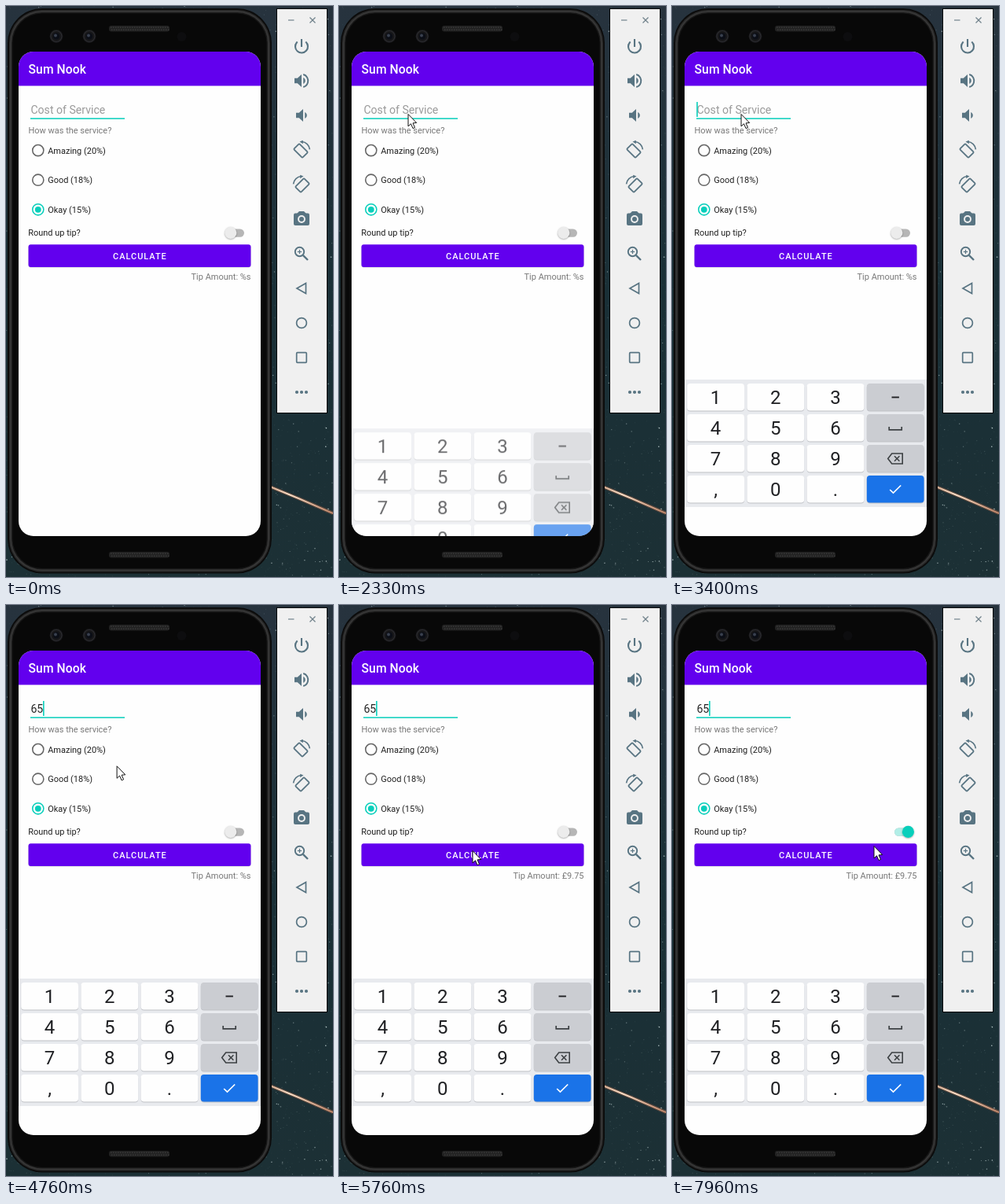
An HTML page with a canvas that plays this animation: 416x726 px, repeating every 8000 ms.

```html
<!DOCTYPE html>
<html lang="en">
<head>
<meta charset="utf-8">
<title>Tip calculator</title>
<style>
html, body { margin: 0; width: 100%; height: 100%; overflow: hidden; background: #14232a; }
canvas { display: block; width: 416px; height: 726px; }
</style>
</head>
<body>
<canvas id="stage"></canvas>
<script>
const W = 416, H = 726, LOOP = 8000;
const DP = 308 / 393; // screen pixels per device-independent pixel
const PURPLE = '#6200ee', TEAL = '#08cfbb', ICON = '#587482';
const dpr = window.devicePixelRatio || 1;

function setup(canvas) {
  canvas.width = W * dpr;
  canvas.height = H * dpr;
  const c = canvas.getContext('2d');
  c.scale(dpr, dpr);
  return c;
}
const stage = setup(document.getElementById('stage'));
const backdrop = document.createElement('canvas');
const keyboard = document.createElement('canvas');
let g = setup(backdrop);

const clamp = v => Math.max(0, Math.min(1, v));
const span = (t, a, b) => clamp((t - a) / (b - a));
const smooth = p => p * p * (3 - 2 * p);

function box(x, y, w, h, r, fill) {
  g.beginPath();
  g.roundRect(x, y, w, h, r);
  if (fill) { g.fillStyle = fill; g.fill(); }
}
function disc(x, y, r, fill) {
  g.beginPath();
  g.arc(x, y, r, 0, Math.PI * 2);
  g.fillStyle = fill;
  g.fill();
}
function ring(x, y, r, color, width) {
  g.beginPath();
  g.arc(x, y, r, 0, Math.PI * 2);
  pen(color, width);
}
function pen(color, width) {
  g.strokeStyle = color;
  g.lineWidth = width;
  g.stroke();
}
function trace(points, closed) {
  g.beginPath();
  points.forEach(([x, y], i) => i ? g.lineTo(x, y) : g.moveTo(x, y));
  if (closed) g.closePath();
}
function line(x1, y1, x2, y2, color, width) {
  trace([[x1, y1], [x2, y2]]);
  pen(color, width);
}
function label(str, x, y, sp, color, { weight = 400, gap = 0, align = 'left' } = {}) {
  g.font = `${weight} ${sp * DP}px Roboto, sans-serif`;
  g.letterSpacing = gap + 'px';
  g.textAlign = align;
  g.fillStyle = color;
  g.fillText(str, x, y);
}

// ---- desktop, phone and side panel ----

function drawDesktop() {
  const sky = g.createLinearGradient(0, 0, 0, H);
  sky.addColorStop(0, '#27333e');
  sky.addColorStop(0.5, '#1a3037');
  sky.addColorStop(1, '#1c3035');
  g.fillStyle = sky;
  g.fillRect(0, 0, W, H);
  let seed = 41;
  const rnd = () => (seed = (seed * 16807) % 2147483647) / 2147483647;
  for (let i = 0; i < 4200; i++) {
    const x = rnd() * W, y = rnd() * H, s = 0.6 + rnd() * 0.8, a = 0.06 + rnd() ** 7 * 0.85;
    g.fillStyle = `rgba(205,222,222,${a})`;
    g.fillRect(x, y, s, s);
  }
  const streak = g.createLinearGradient(337, 0, W, 0);
  streak.addColorStop(0, '#d9b196');
  streak.addColorStop(0.3, '#f8dcc4');
  streak.addColorStop(1, '#bd8468');
  trace([[332, 609.5], [372, 626], [W, 645]]);
  pen('rgba(170,100,70,.4)', 4.5);
  pen(streak, 2);
}

function speaker(y) {
  box(131, y, 77, 7.5, 3, '#222');
  for (let x = 133; x < 207; x += 3) {
    for (let j = 0; j < 2; j++) {
      g.fillStyle = '#393939';
      g.fillRect(x + j, y + 1.5 + j * 3, 1.5, 1.5);
    }
  }
}

function lens(x) {
  disc(x, 38.5, 8.5, '#171719');
  ring(x, 38.5, 7, '#2c2c30', 1.2);
  disc(x, 38.5, 4, '#0b0e16');
  disc(x - 1, 37.5, 2, '#39404e');
}

function drawPhone() {
  const shell = (inset, color) =>
    box(2 + inset, 3 + inset, 336 - inset * 2, 718.5 - inset * 2, 44 - inset, color);
  shell(0, '#0c0c0c');
  shell(2, '#2b2b2b');
  shell(3.5, '#383838');
  shell(5, '#181818');
  shell(6.5, '#080808');
  speaker(25);
  speaker(694);
  lens(64);
  lens(106);
  disc(223.5, 39, 6, '#0d0d0f');
}

function horn(x, y) {
  trace([[x, y - 3.2], [x + 3.8, y - 3.2], [x + 9, y - 8], [x + 9, y + 8], [x + 3.8, y + 3.2], [x, y + 3.2]], true);
  g.fillStyle = ICON;
  g.fill();
}
function wave(x, y, r, a) {
  g.beginPath();
  g.arc(x, y, r, -a, a);
}
function rotateIcon(y, flip) {
  g.save();
  g.translate(376, y);
  g.scale(flip, 1);
  g.save();
  g.translate(-1, 1);
  g.rotate(Math.PI / 4);
  box(-7.8, -5, 15.6, 10, 1.2);
  pen(ICON, 1.8);
  g.restore();
  g.beginPath();
  g.arc(-0.5, 0.5, 11, -1.5, -0.1);
  pen(ICON, 1.6);
  trace([[-2.5, -10.5], [1.8, -12.2], [1.8, -7.8]], true);
  g.fillStyle = ICON;
  g.fill();
  g.restore();
}

function drawPanel() {
  const cx = 376, thin = '#71838c';
  g.fillStyle = '#050708';
  g.fillRect(344, 3, 65, 515);
  g.fillStyle = '#f0f0f0';
  g.fillRect(345, 4, 63, 513);
  line(359, 18, 366.5, 18, thin, 1.2);
  line(386.5, 14.5, 393.5, 21.5, thin, 1.2);
  line(393.5, 14.5, 386.5, 21.5, thin, 1.2);

  g.beginPath();
  g.arc(cx, 51.5, 8, -0.85, Math.PI + 0.85);
  pen(ICON, 2.1);
  line(cx, 42, cx, 52, ICON, 2.1);

  horn(367, 95);
  wave(376, 95, 8.3, 1.3);
  pen(ICON, 1.9);
  wave(376.5, 95, 4.3, 1.15);
  g.fill();
  horn(369, 139);
  wave(378.5, 139, 4.3, 1.15);
  g.fill();

  rotateIcon(183, 1);
  rotateIcon(227, -1);

  box(366, 263.5, 20, 15.5, 2, ICON);
  trace([[370, 264], [373, 261], [379, 261], [382, 264]], true);
  g.fill();
  disc(cx, 271, 4.9, '#f0f0f0');
  disc(cx, 271, 3, ICON);

  ring(373.5, 312.5, 5.7, ICON, 1.9);
  line(377.8, 316.8, 384, 323, ICON, 2.4);
  line(370.8, 312.5, 376.2, 312.5, ICON, 1.2);
  line(373.5, 309.8, 373.5, 315.2, ICON, 1.2);

  trace([[370, 359], [381.5, 352.5], [381.5, 365.5]], true);
  pen(ICON, 1.7);
  ring(cx, 403, 6.4, ICON, 1.7);
  box(369.7, 440.7, 12.6, 12.6, 1);
  pen(ICON, 1.7);
  for (const x of [370, cx, 382]) disc(x, 491, 2.1, ICON);
}

// ---- app screen ----

const LEFT = 16 + 16 * DP, RIGHT = 324 - 16 * DP;
const caretSpans = [[360, 860], [1400, 2100], [2400, 2900], [3400, 4160],
  [4660, 5160], [5660, 6160], [6660, 7160], [7660, 8000]];

function drawField(t) {
  const typed = t < 3460 ? '' : t < 3660 ? '6' : '65';
  label(typed || 'Cost of Service', 31.4, 137, 18, typed ? '#262626' : '#9a9a9a');
  const caretX = 31.2 + (typed ? g.measureText(typed).width : 0);
  g.fillStyle = TEAL;
  g.fillRect(31, 142.4, 120, 1.5);
  if (caretSpans.some(([a, b]) => t >= a && t < b)) g.fillRect(caretX, 122, 1.6, 19);
}

function drawRadio(name, y, on) {
  ring(40.8, y, 9 * DP, on ? TEAL : '#666', 2 * DP);
  if (on) disc(40.8, y, 5 * DP, TEAL);
  label(name, 53.2, y + 4, 14, '#202020');
}

function drawSwitch(p) {
  box(283, 283.4, 20, 10.4, 5.2, '#b6b6b6');
  g.globalAlpha = p;
  box(283, 283.4, 20, 10.4, 5.2, '#b2eee7');
  g.globalAlpha = 1;
  const x = 285.8 + 14.6 * p;
  g.save();
  g.shadowColor = 'rgba(0,0,0,.35)';
  g.shadowBlur = 2 * dpr;
  g.shadowOffsetY = dpr * 0.8;
  disc(x, 288.4, 7.6, '#ececec');
  g.restore();
  g.globalAlpha = p;
  disc(x, 288.4, 7.6, TEAL);
  g.globalAlpha = 1;
}

function drawButton(t) {
  const w = RIGHT - LEFT, h = 36 * DP + 0.4;
  box(LEFT, 304, w, h, 3, 'rgba(0,0,0,.2)');
  box(LEFT, 303.3, w, h, 3, PURPLE);
  if (t >= 5430 && t < 5760) {
    g.save();
    g.clip();
    const fade = 1 - span(t, 5580, 5760);
    disc(170, 317, 25 + 125 * smooth(span(t, 5420, 5620)), `rgba(255,255,255,${0.24 * fade})`);
    g.restore();
  }
  label('CALCULATE', 170.4, 321.7, 14, '#fff', { weight: 500, gap: 1.25 * DP, align: 'center' });
}

function drawKeyGlyph(row, x, y) {
  const ink = '#3c4043';
  if (row === 0) {
    line(x - 4.7, y, x + 4.7, y, '#202124', 1.9);
  } else if (row === 1) {
    trace([[x - 8, y - 1.5], [x - 8, y + 2.3], [x + 8, y + 2.3], [x + 8, y - 1.5]]);
    pen(ink, 1.7);
  } else if (row === 2) {
    trace([[x - 9.5, y], [x - 4.5, y - 6.5], [x + 9, y - 6.5], [x + 9, y + 6.5], [x - 4.5, y + 6.5]], true);
    pen(ink, 1.6);
    for (const s of [-1, 1]) line(x - 1.2, y - 3.2 * s, x + 5.2, y + 3.2 * s, ink, 1.6);
  } else {
    trace([[x - 7, y + 0.5], [x - 2.7, y + 4.6], [x + 7, y - 5]]);
    pen('#fff', 1.7);
  }
}

function drawKeys() {
  g.fillStyle = '#e8eaee';
  g.fillRect(16, 475, 308, 162);
  ['123', '456', '789', ',0.'].forEach((keys, row) => {
    const y = 480 + row * 39;
    for (let col = 0; col < 4; col++) {
      const x = 19.2 + col * 76.2;
      const fill = col < 3 ? '#fefefe' : row < 3 ? '#cbcdd2' : '#1a73e8';
      box(x, y + 1, 72.8, 34.5, 4, '#bfc1c6');
      box(x, y, 72.8, 34.4, 4, fill);
      if (col < 3) label(keys[col], x + 36.4, y + 26.3, 24 / DP, '#202124', { align: 'center' });
      else drawKeyGlyph(row, x + 36.4, y + 17.5);
    }
  });
}

// Slides and fades in as one layer.
function showKeyboard(t) {
  if (t < 2260) return;
  const p = span(t, 2230, 2460);
  g.globalAlpha = Math.min(1, p * 1.5);
  g.drawImage(keyboard, 0, 176 * (1 - p) ** 1.8, W, H);
  g.globalAlpha = 1;
}

function drawApp(t) {
  g.save();
  box(16, 58, 308, 616, 19, '#fefefe');
  g.clip();
  g.fillStyle = PURPLE;
  g.fillRect(16, 58, 308, 43.5);
  label('Sum Nook', LEFT, 86, 20, '#fff', { weight: 500, gap: 0.1 });
  drawField(t);
  label('How was the service?', LEFT, 161.6, 14, '#777');
  drawRadio('Amazing (20%)', 183.6, false);
  drawRadio('Good (18%)', 221.2, false);
  drawRadio('Okay (15%)', 258.8, true);
  label('Round up tip?', LEFT - 0.3, 292.3, 14, '#202020');
  drawSwitch(smooth(span(t, 7200, 7450)));
  drawButton(t);
  label('Tip Amount: ' + (t < 5530 ? '%s' : '£9.75'), RIGHT, 348.3, 14, '#777', { align: 'right' });
  showKeyboard(t);
  g.restore();
}

// ---- pointer: time, x, y ----

const route = [
  [560, 171, 298], [800, 140, 225], [1050, 100, 156], [1260, 87.5, 137],
  [4560, 87.5, 137], [4760, 140.5, 204], [5000, 164, 278], [5300, 169.5, 312],
  [6200, 169.5, 312], [6400, 205, 304], [6640, 270, 289], [6830, 289, 284],
  [7660, 289, 284], [7960, 256.5, 306]
];

function drawPointer(t) {
  if (t < route[0][0]) return;
  let i = route.findIndex(k => k[0] > t);
  if (i < 0) i = route.length - 1;
  const [ta, xa, ya] = route[i - 1], [tb, xb, yb] = route[i];
  const p = span(t, ta, tb);
  g.save();
  g.translate(xa + (xb - xa) * p, ya + (yb - ya) * p);
  trace([[0.5, 0.5], [0.5, 16], [4, 12.8], [6.5, 18.6], [9, 17.5], [6.5, 11.9], [11.2, 11.5]], true);
  g.fillStyle = '#fff';
  g.fill();
  pen('#111', 1);
  g.restore();
}

drawDesktop();
drawPhone();
drawPanel();
g = setup(keyboard);
drawKeys();
g = stage;

const start = performance.now();
function frame() {
  const t = (performance.now() - start) % LOOP;
  g.drawImage(backdrop, 0, 0, W, H);
  drawApp(t);
  drawPointer(t);
  requestAnimationFrame(frame);
}
frame();
</script>
</body>
</html>
```
